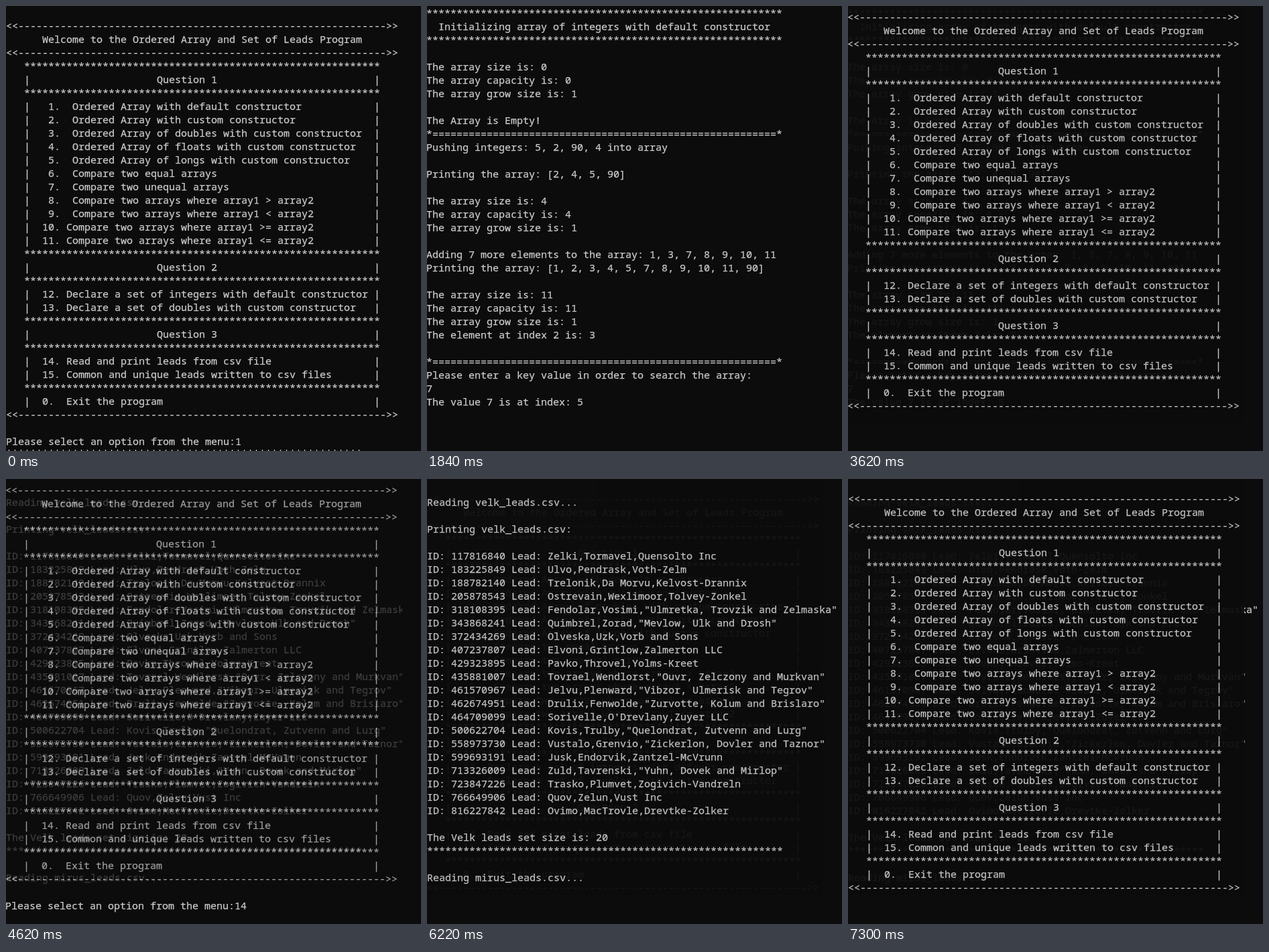
Write an HTML page that moves like this. It is 619x664 px and loops after 7.36 s.

```html
<!DOCTYPE html>
<html lang="en">
<head>
<meta charset="utf-8">
<title>Console program</title>
<style>
  html, body {
    margin: 0;
    width: 100%;
    height: 100%;
    overflow: hidden;
    background: #0c0c0c;
  }
  .scene {
    position: absolute;
    left: 0;
    top: 0;
    width: 619px;
    height: 664px;
    overflow: hidden;
    background: #0c0c0c;
    animation: show 7360ms calc(var(--i) * 1840ms - 7360ms) infinite both;
  }
  pre {
    position: absolute;
    left: var(--x, 0);
    top: var(--y, 0);
    margin: 0;
    color: #ccc;
    font: 15px/20px "Noto Sans Mono", "DejaVu Sans Mono", monospace;
    font-variant-ligatures: none;
    -webkit-text-stroke: .25px #ccc;
  }
  .cut { position: relative; top: -2px; }

  /* Solid for a quarter, hidden, then fading in over the previous scene. */
  @keyframes show {
    0% {
      opacity: 1; z-index: 1; clip-path: inset(0 0 0 0);
      animation-timing-function: step-end;
    }
    25% {
      opacity: 0; z-index: 2; clip-path: inset(0 28px 44px 0);
      animation-timing-function: step-end;
    }
    84.5108% {
      opacity: var(--first, .05);
      animation-timing-function: step-end;
    }
    85.326% {
      opacity: .1;
      animation-timing-function: steps(18, end);
    }
    100% { opacity: 1; z-index: 2; clip-path: inset(0 28px 44px 0); }
  }
</style>
</head>
<body>
<div class="scene" style="--i:0; --y:-1px"><pre id="menu1"></pre></div>
<div class="scene" style="--i:1; --x:-1px"><pre id="array"></pre></div>
<div class="scene" style="--i:2; --x:-1px; --y:-14px; --first:0"><pre id="menu2"></pre></div>
<div class="scene" style="--i:3; --y:4px"><pre id="leads"></pre></div>
<script>
  const STARS = '*'.repeat(59);
  const RULE = '<<' + '-'.repeat(61) + '>>';
  const DIVIDER = '*' + '='.repeat(57) + '*';

  const boxed = text => '   |' + text.padEnd(57) + '|';
  const starred = '   ' + STARS;
  const question = n => [starred, boxed(' '.repeat(21) + 'Question ' + n), starred];
  const item = text => boxed('  ' + text);

  const menu = choice => [
    '',
    RULE,
    '      Welcome to the Ordered Array and Set of Leads Program',
    RULE,
    ...question(1),
    ...[
      ' 1.  Ordered Array with default constructor',
      ' 2.  Ordered Array with custom constructor',
      ' 3.  Ordered Array of doubles with custom constructor',
      ' 4.  Ordered Array of floats with custom constructor',
      ' 5.  Ordered Array of longs with custom constructor',
      ' 6.  Compare two equal arrays',
      ' 7.  Compare two unequal arrays',
      ' 8.  Compare two arrays where array1 > array2',
      ' 9.  Compare two arrays where array1 < array2',
      '10. Compare two arrays where array1 >= array2',
      '11. Compare two arrays where array1 <= array2'
    ].map(item),
    ...question(2),
    item('12. Declare a set of integers with default constructor'),
    item('13. Declare a set of doubles with custom constructor'),
    ...question(3),
    item('14. Read and print leads from csv file'),
    item('15. Common and unique leads written to csv files'),
    starred,
    item('0.  Exit the program'),
    RULE,
    '',
    'Please select an option from the menu:' + choice
  ];

  const stats = n => [
    'The array size is: ' + n,
    'The array capacity is: ' + n,
    'The array grow size is: 1'
  ];

  const array = [
    STARS,
    '  Initializing array of integers with default constructor',
    STARS,
    '',
    ...stats(0),
    '',
    'The Array is Empty!',
    DIVIDER,
    'Pushing integers: 5, 2, 90, 4 into array',
    '',
    'Printing the array: [2, 4, 5, 90]',
    '',
    ...stats(4),
    '',
    'Adding 7 more elements to the array: 1, 3, 7, 8, 9, 10, 11',
    'Printing the array: [1, 2, 3, 4, 5, 7, 8, 9, 10, 11, 90]',
    '',
    ...stats(11),
    'The element at index 2 is: 3',
    '',
    DIVIDER,
    'Please enter a key value in order to search the array:',
    '7',
    'The value 7 is at index: 5'
  ];

  const people = [
    [117816840, 'Zelki,Tormavel,Quensolto Inc'],
    [183225849, 'Ulvo,Pendrask,Voth-Zelm'],
    [188782140, 'Trelonik,Da Morvu,Kelvost-Drannix'],
    [205878543, 'Ostrevain,Wexlimoor,Tolvey-Zonkel'],
    [318108395, 'Fendolar,Vosimi,"Ulmretka, Trovzik and Zelmaska"'],
    [343868241, 'Quimbrel,Zorad,"Mevlow, Ulk and Drosh"'],
    [372434269, 'Olveska,Uzk,Vorb and Sons'],
    [407237807, 'Elvoni,Grintlow,Zalmerton LLC'],
    [429323895, 'Pavko,Throvel,Yolms-Kreet'],
    [435881007, 'Tovrael,Wendlorst,"Ouvr, Zelczony and Murkvan"'],
    [461570967, 'Jelvu,Plenward,"Vibzor, Ulmerisk and Tegrov"'],
    [462674951, 'Drulix,Fenwolde,"Zurvotte, Kolum and Brislaro"'],
    [464709099, "Sorivelle,O'Drevlany,Zuyer LLC"],
    [500622704, 'Kovis,Trulby,"Quelondrat, Zutvenn and Lurg"'],
    [558973730, 'Vustalo,Grenvio,"Zickerlon, Dovler and Taznor"'],
    [599693191, 'Jusk,Endorvik,Zantzel-McVrunn'],
    [713326009, 'Zuld,Tavrenski,"Yuhn, Dovek and Mirlop"'],
    [723847226, 'Trasko,Plumvet,Zogivich-Vandreln'],
    [766649906, 'Quov,Zelun,Vust Inc'],
    [816227842, 'Ovimo,MacTrovle,Drevtke-Zolker']
  ];

  const leads = [
    '',
    'Reading velk_leads.csv...',
    '',
    'Printing velk_leads.csv:',
    '',
    ...people.map(([id, lead]) => `ID: ${id} Lead: ${lead}`),
    '',
    'The Velk leads set size is: 20',
    STARS,
    '',
    'Reading mirus_leads.csv...'
  ];

  const print = (id, lines) => {
    const pre = document.getElementById(id);
    pre.textContent = lines.join('\n');
    return pre;
  };

  const first = print('menu1', [...menu(1), '']);
  const cut = document.createElement('span');
  cut.className = 'cut';
  cut.textContent = STARS;
  first.append(cut);

  print('array', array);
  print('menu2', menu(14));
  print('leads', leads);
</script>
</body>
</html>
```
